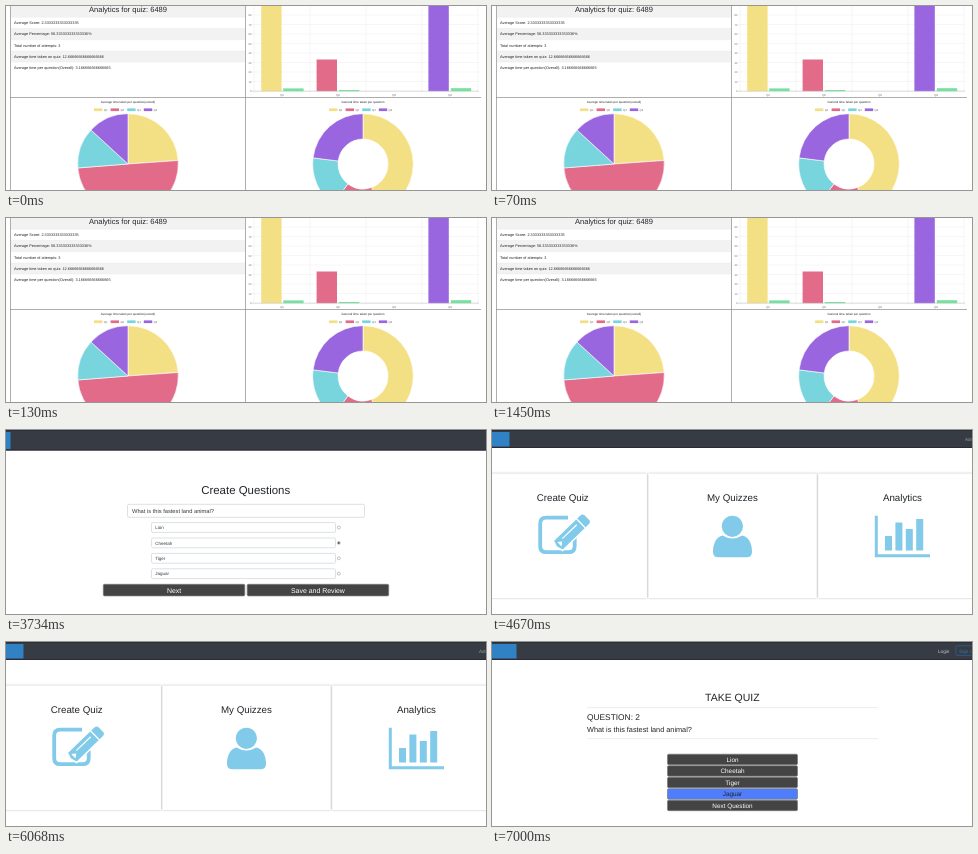
An HTML page that plays this animation: 480x184 px, repeating every 8000 ms.

```html
<!DOCTYPE html>
<html lang="en">
<head>
<meta charset="utf-8">
<title>Quiz app tour</title>
<style>
html, body { margin: 0; width: 100%; height: 100%; overflow: hidden; background: #fff; }
#reel { display: block; width: 480px; height: 736px; animation: reel 8s step-end infinite; }
text { font-family: "Liberation Sans", Arial, sans-serif; fill: #212529; text-rendering: geometricPrecision; }
.mid { text-anchor: middle; }
.light { fill: #fff; }
@keyframes reel {
  0% { transform: translateY(0); }
  29.125% { transform: translateY(-184px); }
  58.375% { transform: translateY(-368px); }
  87.5% { transform: translateY(-552px); }
}
</style>
</head>
<body>
<svg id="reel" viewBox="0 0 480 736"></svg>
<script>
const YELLOW = '#f4e084', PINK = '#e26b8a', CYAN = '#78d5de', PURPLE = '#9966e0', GREEN = '#72e39c';
const SERIES = [YELLOW, PINK, CYAN, PURPLE];
const ICON = '#81caea', DARK = '#444';

const rect = (x, y, w, h, fill, more = '') =>
  `<rect x="${x}" y="${y}" width="${w}" height="${h}" fill="${fill}" ${more}/>`;
const text = (x, y, size, str, cls = '', more = '') =>
  `<text x="${x}" y="${y}" font-size="${size}" class="${cls}" ${more}>${str}</text>`;
const line = (d, color, width = 1) =>
  `<path d="${d}" fill="none" stroke="${color}" stroke-width="${width}"/>`;
const each = (list, fn) => list.map(fn).join('');

// Ring slice between two clockwise angles measured from twelve o'clock.
function slice(cx, cy, r, hole, from, to, fill) {
  const at = (radius, deg) => {
    const a = deg * Math.PI / 180;
    return `${cx + radius * Math.sin(a)} ${cy - radius * Math.cos(a)}`;
  };
  const big = to - from > 180 ? 1 : 0;
  return `<path d="M${at(r, from)}A${r} ${r} 0 ${big} 1 ${at(r, to)}L${at(hole, to)}` +
    `A${hole} ${hole} 0 ${big} 0 ${at(hole, from)}Z" fill="${fill}" stroke="#fff" stroke-width=".6"/>`;
}

function ring(cx, hole, title, stops) {
  return text(cx, 97, 3.03, title, 'mid') +
    each(SERIES, (c, i) => {
      const x = cx - 34 + i * 16.6;
      return rect(x, 102.4, 8.4, 2.7, c) + text(x + 9.8, 104.9, 2.8, 'Q' + (i + 1), '', 'fill-opacity=".7"');
    }) +
    each(SERIES, (c, i) => slice(cx, 158, 50.3, hole, stops[i], stops[i + 1], c));
}

function analytics() {
  const stats = [
    'Average Score: 2.3333333333333335',
    'Average Percentage: 58.333333333333336%',
    'Total number of attempts: 3',
    'Average time taken on quiz: 12.66666666666666666',
    'Average time per question(Overall): 3.166666666666665'
  ];
  const bars = [[255.2, 0, YELLOW], [277.2, 82.4, GREEN], [310.6, 53.5, PINK],
    [332.8, 84, GREEN], [422.4, 0, PURPLE], [444.8, 82.2, GREEN]];
  const ticks = [0, 1, 2, 3, 4, 5, 6, 7, 8];
  return each([0, 22.5, 45], y => rect(5, y, 234, 11, '#f2f2f2')) +
    each([11.3, 22.5, 33.7, 45, 56], y => line(`M5 ${y}H239`, '#e2e5e8', .4)) +
    text(122, 5.9, 7.55, 'Analytics for quiz: 6489', 'mid') +
    each(stats, (s, i) => text(8, 18.4 + i * 11.05, 3.83, s)) +
    each(ticks, i => line(`M246 ${85 - i * 9.5}H473`, '#ececec', .5) +
      text(245.5, 86 - i * 9.5, 2.7, i * 10, '', 'text-anchor="end" fill-opacity=".7"')) +
    each([0, 1, 2, 3, 4], i => line(`M${248 + i * 56} 0V87`, '#e8e8e8', .5)) +
    each(bars, ([x, y, c]) => rect(x, y, 20.4, 85.2 - y, c)) +
    line('M246 85.2H473', '#bbb', .5) +
    each([1, 2, 3, 4], i => text(220 + i * 56, 90, 2.8, 'Q' + i, 'mid', 'fill-opacity=".7"')) +
    ring(122, 0, 'Average time taken per question(overall)', [0, 86, 265.5, 312.6, 360]) +
    ring(357, 25, 'General time taken per question', [0, 160, 217, 277, 360]) +
    line('M4.5 0V184M239.5 0V184M4 91.5H475', '#8c8c8c', .7);
}

const nav = (h, tab) => rect(0, 0, 480, h, '#363b44') + rect(0, 0, 480, 1, '#2c3038') +
  rect(0, h - 1, 480, 1, '#2f2838') + rect(0, 2, tab, h - 3.5, '#3182c4');

const field = (x, y, w, h, size, str, pad) =>
  rect(x, y, w, h, '#fff', 'rx="1.5" stroke="#ced4da" stroke-width=".7"') +
  text(x + pad, y + h / 2 + size * .36, size, str, '', 'fill-opacity=".9"');

const button = (x, y, w, h, size, str, fill = DARK, cls = 'light') =>
  rect(x, y, w, h, fill, 'rx="1.3" stroke="#77797c" stroke-width=".7"') +
  text(x + w / 2, y + h / 2 + size * .35, size, str, 'mid ' + cls);

const ANIMALS = ['Lion', 'Cheetah', 'Tiger', 'Jaguar'];
const QUESTION = 'What is this fastest land animal?';

function create() {
  return nav(20.5, 4.5) +
    text(239.7, 64.2, 11.45, 'Create Questions', 'mid') +
    field(121.5, 74.3, 237, 13, 5.72, QUESTION, 4.5) +
    each(ANIMALS, (a, i) => {
      const y = 92.6 + i * 15.4;
      return field(145.5, y, 184, 9.8, 4.5, a, 3.7) +
        `<circle cx="332.8" cy="${y + 4.9}" r="1.5" fill="#fff" stroke="#888" stroke-width=".5"/>` +
        (i === 1 ? `<circle cx="332.8" cy="${y + 4.9}" r=".9" fill="#333"/>` : '');
    }) +
    button(97.3, 154.3, 141.5, 11.6, 6.93, 'Next') +
    button(241.2, 154.3, 141.5, 11.6, 6.93, 'Save and Review');
}

function menu() {
  const card = (x, w, cx, title) =>
    rect(x, 43.5, w, 124.5, '#fff', 'style="filter:drop-shadow(0 .5px .8px #0004)"') +
    text(cx, 71.3, 9.75, title, 'mid');
  const columns = [[393, 106], [403.4, 92.5], [413.8, 99], [424.2, 89]];
  return nav(18, 17.5) + text(473, 10.8, 4.6, 'Admin', '', 'style="fill:#9a9da2"') +
    card(-6, 161, 70.7, 'Create Quiz') +
    card(156.4, 168.4, 240.4, 'My Quizzes') +
    card(326.2, 168, 410.4, 'Analytics') +
    line('M76 87.7H54.2Q48.2 87.7 48.2 93.7V116.2Q48.2 122.2 54.2 122.2H76.7Q82.7 122.2 82.7 116.2V107', ICON, 3.8) +
    `<g transform="translate(64.5 117) rotate(-44)" fill="${ICON}" stroke="#fff" stroke-width="1.5">` +
    `<path d="M0 0L2 -6.8H39Q43 -6.8 43 -3V3Q43 6.8 39 6.8H2Z"/>` +
    `<path d="M34 -6.8V6.8M10 -2H30" fill="none" stroke-width="1.2"/>` +
    `<path d="M4 -3L8 0L4 3Z" fill="#fff" stroke="none"/></g>` +
    `<circle cx="240.4" cy="96.3" r="10.6" fill="${ICON}"/>` +
    `<path d="M230.5 105.5Q240.4 111.5 250.3 105.5C257 107 260 114 260 122Q260 127.3 254.5 127.3H226.5Q221 127.3 221 122C221 114 224 107 230.5 105.5Z" fill="${ICON}"/>` +
    line('M384.3 85.7V125.7H438', ICON, 3) +
    each(columns, ([x, y]) => rect(x, y, 7, 120.5 - y, ICON));
}

function take() {
  return nav(18, 24.5) +
    text(446, 10.5, 4.7, 'Login', '', 'style="fill:#c8cacd"') +
    rect(463.8, 3.8, 30, 9.6, 'none', 'rx="1.2" stroke="#2b6596" stroke-width=".7"') +
    text(467, 10.5, 4.7, 'Sign Up', '', 'style="fill:#2f78b4"') +
    text(240.4, 59, 10.5, 'TAKE QUIZ', 'mid') +
    line('M95 65.6H386M95 96.6H386', '#e6e6e6', .7) +
    text(95, 77.5, 8.37, 'QUESTION: 2') +
    text(95, 90.4, 7.32, QUESTION) +
    each([...ANIMALS, 'Next Question'], (s, i) => {
      const picked = s === 'Jaguar';
      return button(175.5, 112.2 + i * 11.5, 130, 10.5, 6.37, s, picked ? '#4f7dfb' : DARK, picked ? '' : 'light');
    });
}

document.getElementById('reel').innerHTML = each([analytics, create, menu, take], (scene, i) =>
  `<svg y="${i * 184}" width="480" height="184" viewBox="0 0 480 184">${rect(0, 0, 480, 184, '#fff')}${scene()}</svg>`);
</script>
</body>
</html>
```
